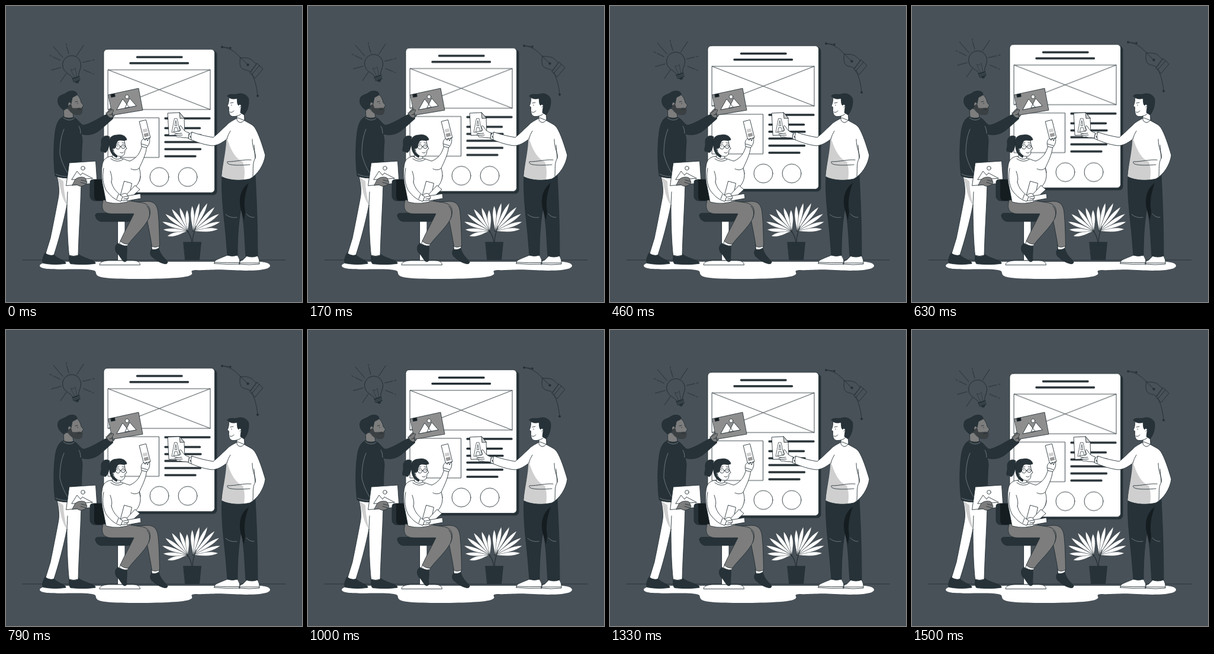
These frames come from a looping animation (500x500 px, 1.54 s). An HTML page:

```html
<!DOCTYPE html>
<html lang="en">
<head>
<meta charset="utf-8">
<title>Wireframe team</title>
<style>
  html, body { margin: 0; width: 100%; height: 100%; overflow: hidden; background: #485158; }
  svg { display: block; width: 100vw; height: 100vh; }
  .float { animation: float 1540ms linear -40ms infinite; }
  @keyframes float {
    0%, 100% { transform: translateY(.3px); }
    50% { transform: translateY(-9.600px); }
  }
  .ink { stroke: #222d32; stroke-width: .85; stroke-linecap: round; stroke-linejoin: round; }
  .w { fill: #fff; }
  .d { fill: #263238; }
  .k { fill: #151d21; }
  .g { fill: #7d7d7d; }
  .c { fill: #8e8e8e; }
  .l { fill: #cfcfcf; }
  .n { fill: none; }
  .bar { stroke-width: 3.4; fill: none; }
  .pale { stroke: #9aa1a5; stroke-width: .6; fill: none; }
  .bare { stroke: none; }
</style>
</head>
<body>
<svg viewBox="0 0 500 500" class="ink">
  <!-- floor -->
  <path class="n" d="M28 429H472"/>
  <path class="w bare" d="M57 439C57 433 74 432 100 432H400C430 430 447 433 446 439C445 447 412 448 380 446C350 444 336 447 322 446C308 446 316 450 314 453C309 459 280 460 240 461C195 461 160 461 154 455C149 449 157 447 138 445C108 443 59 448 57 439Z"/>

  <g class="float">
    <!-- board -->
    <rect class="d" x="168.500" y="76" width="187.500" height="243" rx="6"/>
    <rect class="w" x="165" y="73.300" width="187.500" height="242.200" rx="6"/>
    <path class="bar" d="M221.500 86.500H297M210 96.700H307.500M269 190H344M269 206.500H327.500M269 218.500H329M269 230H329.500M269 242H328.500M269 254H320"/>
    <path class="n" d="M172.500 108H345V175H172.500ZL345 175M345 108L172.500 175M172.500 189H258.500V256H172.500Z"/>
    <g class="w">
      <circle cx="211" cy="289" r="16"/><circle cx="259" cy="289" r="16"/><circle cx="307" cy="289" r="16"/>
    </g>
    <!-- bulb -->
    <g class="n">
      <path d="M80 68.500L96 87M102 64V66.500M102.500 69L106 81M131 66.500L119.500 84M149 91L146 91.700M143 92.400L129.500 95.500M148 115L146 114.300M143.500 113L131 108M92 128.500L102 114M76.500 108.500L93 104M74 83.500L77 85M79.500 86.200L91.500 92"/>
      <g transform="translate(111 99.500) rotate(-18)">
        <path d="M-5.500 22C-5.500 15 -15.500 11 -15.500 0A15.500 15.500 0 0 1 15.500 0C15.500 11 5.500 15 5.500 22Z"/>
        <path stroke-width=".5" d="M-2 22L-4 7L0 9L4 7L2 22"/>
        <path class="d" d="M-6 22.500H6L5.500 29H-5.500ZM-3 29H3L1.500 32H-1.500Z"/>
        <path stroke="#687178" stroke-width=".6" d="M-6 25L6 24.500M-5.500 27.600L5.500 27"/>
      </g>
    </g>
    <!-- pen -->
    <g class="n">
      <path d="M365 69.500L379 71M365 69.500C378 71 387 77 396 87.500M415 114C421 126 424 139 425 152"/>
      <circle class="d" cx="365" cy="69.500" r="1.500"/><circle class="d" cx="379" cy="71" r="1.200"/><circle class="d" cx="425" cy="152" r="1.500"/>
      <path d="M396 87.500C394 95 395 103 399 106C404 109 409 108 413 112L423 98C418 95 417 91 411 89C406 87 400 88 396 87.500ZL408 99"/>
      <circle class="d" cx="408.500" cy="99.500" r="1.700"/>
      <path d="M412 112.500L424 97L434 106.500L421 122ZM416 115L428 101"/>
    </g>
  </g>

  <!-- plant -->
  <g>
    <g id="fans" class="w" stroke-width=".4"></g>
    <path class="n" stroke-width="1.100" d="M314 400C313 390 310 384 305 379M315 400C315 390 317 384 321 372"/>
    <path class="d" d="M300 399H329.500L326.500 428.500H303Z"/>
  </g>

  <!-- man on the left -->
  <g>
    <path class="d" d="M66 417C62 424 60 432 63 434.500C76 437 90 437 101 435C102 430 87 428 81 420ZM107 420C106 428 107 434 109 435.500C123 437 139 437 151 435C152 429 134 428 122 419Z"/>
    <path class="w" d="M86 287C89 301 91 312 88 326C84 347 79 373 75 392L67 418Q74 423 81 420.500C89 396 97 366 103 336C103 365 104 398 106.500 421Q114 424 122 421C123 380 126 340 127 300L126 285Z"/>
    <path class="l bare" d="M87 289L97 296C97 309 100 322 102.500 335C94 326 92 306 87 289Z"/>
    <path class="n" d="M103 336L104 314"/>
    <path class="g" d="M97 172L98 190Q107 195 114 188L112 176Z"/>
    <path class="g" d="M106 150H120C124 153 126 158 127 163L131 168L128.500 170.500C129 178 129 183 123 183.500C114 184 105 178 104 170Z"/>
    <path class="bare" fill="#3b4043" d="M104 169L110 165L112 172C118 174 123 170 128 172.500C130 180 128 184 122 184C113 183 107 179 104 169Z"/>
    <path class="d" d="M98 176C91 172 85 164 88.500 155C91 150 98 150 103 146C109 142 119 143 120 148.500C120 152 115 152 112 155L110 165C108 160 103 163 105 170Z"/>
    <path class="n" d="M117 162L121 161M121 164V165M121 175L127 174.500"/>
    <path class="d" d="M97 187C89 190 85 199 83 213C80 235 80 265 83 287C97 293 115 291 127 285C128 272 127 250 129 229C129 224 128 220 127 216C138 220 151 216 158 210C167 203 174 196 181 190L172 182C160 187 147 197 133 201C126 203 124 192 114 188Q105 191 97 187Z"/>
    <path class="pale" d="M97 189Q106 196 115 190M98 208C92 222 91 237 91 250C94 264 100 276 106 285M126 215Q126 207 123 203M84 284C90 287 97 288 103 288"/>
    <path class="w" d="M107 265L151.500 262L154 299L102 303.500Z"/>
    <circle class="w" cx="130" cy="274" r="3.300"/>
    <path class="w" d="M111 293L120 279L126 286L129 282L146 291Z"/>
    <path class="g" d="M117 293C122 288 131 288 134 291L137 298C133 305 125 306 120 302L112 303ZM127 294L135 296M126 298L134 300"/>
    <path class="g" d="M170 182C171 177 178 171 182 172L184 180C184 187 180 190 177 189Z"/>
    <path class="c" d="M173 150L224 139L231 176L180 184.500Z"/>
    <path class="k" d="M177 149.500L183.500 148.200L184.300 153L178 154.200Z"/>
    <circle class="w" cx="204.500" cy="153.300" r="3.200"/>
    <path class="w" d="M201 172L209 156L220 168.500ZM187 175L197 157L208 171Z"/>
    <path class="g" d="M169 181C174 180 177 174 181 175C183 177 179 180 179 183L181 187C177 191 173 188 169 181ZM175 184L181 182"/>
  </g>

  <!-- chair and woman -->
  <g>
    <path class="d" d="M142 299Q141 293 148 293H164Q169 294 169 300V324Q168 329 162 329H149Q143 328 142 322Z"/>
    <path class="k bare" d="M150 293H164Q169 294 169 300V324Q168 329 162 329H154Q149 328 149 322V299Q148 295 150 293Z"/>
    <path class="w" d="M189 363H201V430H189Z"/>
    <path class="w" d="M158 437C158 432 166 430 176 430H214C223 430 226 433 226.500 437Z"/>
    <path class="d" d="M151 354Q151 350 156 350H212Q217 351 215 356Q213 364 205 364H160Q152 362 151 354Z"/>
    <path class="w" d="M246 404L259 404L258 412H247ZM194 396L208 401L203 407L192 402Z"/>
    <path class="d" d="M246 411Q252 413 258 409C260 419 267 425 273 432Q273 437 266 435C258 433 252 428 246 423C243 419 243 414 246 411ZM189 401Q197 406 204 405C205 414 203 421 204 430Q201 434 197 430C193 425 191 420 187 417C183 411 184 404 189 401Z"/>
    <path class="g" d="M204 332L239 330C251 330 256 337 257 350C259 370 259 389 259.500 405Q253 409 246.500 406C244 389 240 371 237 354L230 344Z"/>
    <path class="g" d="M164 328C160 343 164 351 180 351H216C209 366 200 381 193 397Q199 403 207 402C216 389 234 374 241 359C247 344 242 334 228 332L200 328Z"/>
    <path class="n" d="M241 359C244 351 243 344 238 338"/>

    <path class="d" d="M175 221C168 216 160 222 161 231C162 238 158 242 161 246C165 244 165 249 169 247C174 241 175 233 174 227Z"/>
    <path class="w" d="M180 244V259Q188 264 194 257L193 251Z"/>
    <path class="w" d="M181 230C185 224 196 222 200 228L201.500 236L204 241L201 243C201 250 199 255 192 254C185 254 179 247 181 230Z"/>
    <path class="d" d="M175 237C171 226 177 218 187 218C194 216 203 219 204 226C198 229 193 225 189 228C185 232 186 238 183 241C179 238 179 245 182 248L188 253L187 256C180 253 175 246 175 237Z"/>
    <g class="n">
      <circle cx="189" cy="238" r="3.700"/><circle cx="198" cy="237.500" r="3.300"/>
      <path d="M192.700 237.500H194.700M180 237.500L185.300 238M189 237V238M198 236.500V237.500M193 247.500Q197 249.500 199 246.500M187 232L191 231M196 231L200 231.500"/>
    </g>

    <path class="w" d="M178 254Q170 254 165 261C160 270 161 293 164 305L169 331Q190 337 214 328C211 318 217 308 223 300C228 291 228 283 225 274C229 265 237 250 237.500 238L230 235C227 248 221 257 209 262C202 260 198 258 194 257Q186 262 178 254Z"/>
    <path class="n" d="M225 274C222 277 216 278 211 275M177 258Q188 266 198 259"/>
    <path class="w" d="M225.500 195L236.500 192.300L244 222.500L233 225.500Z"/>
    <path class="l bare" d="M230.500 208.500L238 206.800L239.500 212L232 214Z"/>
    <path class="bare" fill="#999" d="M232.500 216L240 214L241.300 219.500L234 221.500Z"/>
    <path class="w" d="M229 237C227 230 229 225 233 224L235 227L237 223L239 228L242 222C244 228 242 234 238 239ZM229 233L239 236"/>
    <path class="w" d="M200 296L212.500 299.500L208 322L193 322Z"/>
    <path class="w" d="M203 319L218 303L226 310L207 327Z"/>
    <path class="w" d="M204 321L227 317L228 325L205 329Z"/>
    <path class="w" d="M193 321C196 316 203 315 205 319L207 324C204 330 197 330 190 327ZM198 323L205 321M199 326L206 325"/>
    <path class="w" d="M165 274C162 289 164 301 169 311C177 322 185 328 194 330L197 322C188 316 180 308 178 297"/>
    <path class="n" d="M178 297C180 292 178 285 176 279M190 318L187 326"/>
  </g>

  <!-- man on the right -->
  <g>
    <path class="w" d="M352 435C351 429 358 428 364 425L374 421H391Q396 428 395 436Q373 437 352 435ZM394 436Q393 431 400 429L407 422H425Q429 429 428 436Q411 438 394 436Z"/>
    <path class="n" d="M352 433Q373 434 395 433.500M394 434H428"/>
    <path class="d" d="M365 286C363 318 368 354 371 384L374 421Q382 424 391 421C391 395 392 370 397 341C403 367 403 398 405 422Q416 426 425 422C425 381 424 341 421 286Z"/>
    <path class="k bare" d="M396 341C393 324 397 308 410 299C405 313 401 328 404 348L402 362Z"/>
    <path class="pale" d="M371 352Q379 359 390 357M406 351Q412 358 419 357"/>

    <path class="w" d="M273.500 181L293 180L301 189.500L302 217.500L275.500 218.500Z"/>
    <path class="l" d="M293 180L294 190L301 189.500Z"/>
    <path class="w" stroke-width=".7" d="M280 213L284.500 190H289L293.500 211H290.500L289.300 205.500H284.800L283.500 212.500ZM285.300 202L286.800 193.500L288.700 202Z"/>

    <path class="w" d="M391 180L389 195Q398 199 403 192L402 180Z"/>
    <path class="w" d="M377 154C376 160 377 163 374 168.500L376.500 171C376 179 377 186 383 186.500C392 187 400 183 402 174L403 156Z"/>
    <path class="d" d="M374 152C377 147 386 151 392 148.500C401 146 411 152 410 161C410 170 407 178 402 184L396 180L397 172C399 168 395 164 393 168C390 166 391 160 390 156C384 158 378 157 374 152Z"/>
    <path class="n" d="M379 164L384 163M381 167V168M378 179Q382 181 385 177M395 171Q398 167 398 172"/>
    <path class="w" d="M391 189C384 193 377 196 372 202C364 209 358 216 350 222C338 220 325 217 314 213Q307 217 308 224C322 230 336 235 349 236C360 235 367 229 373 225C372 247 366 266 364 288C377 295 400 295 412 292C425 285 436 268 438 252C433 235 427 216 420 205C415 199 410 198 402 193Z"/>
    <path class="l bare" d="M372.500 221C372 246 366 266 364.500 287.500C377 294 391 294 402 293C404 282 403 271 400 263C386 257 379 241 372.500 221Z"/>
    <path class="n" d="M373 225Q375 217 379 211M416 225C416 242 423 249 421 257C416 266 418 274 417 288M421 257L419 235M414 260C400 259 389 263 374 263C371 269 390 270 412 268M390 190Q389 195 396 197Q403 195 404 190M314 213Q311 219 313 226"/>
    <circle class="d" cx="311.500" cy="221" r=".6"/>
    <path class="w" d="M309 214C302 213 299 208 296 203C293 201 292 204 295 209C295 212 290 212 285 212C282 214 285 215 290 215.500C285 216 283 218 288 218.500C286 220.500 289 222 294 221C298 223 303 222 308 223ZM290 215.500L297 215M288 218.500L298 218"/>
  </g>
</svg>
<script>
  const fans = document.getElementById('fans');
  const leaf = (x, y, deg, len) => {
    const p = document.createElementNS('http://www.w3.org/2000/svg', 'path');
    p.setAttribute('d', `M0 0C${len * .4} -2 ${len * .65} -6 ${len} 0C${len * .7} 5 ${len * .4} 3 0 0Z`);
    p.setAttribute('transform', `translate(${x} ${y}) rotate(${deg})`);
    fans.append(p);
  };
  // leaves are longest in the middle of a fan
  const fan = (x, y, from, to, n, len) => {
    for (let i = 0; i < n; i++) {
      const u = i / (n - 1);
      leaf(x, y, from + (to - from) * u, len + 12 * Math.sin(Math.PI * u));
    }
  };
  fan(307, 380, -194, -92, 7, 36);
  fan(316, 380, -92, -4, 7, 43);
</script>
</body>
</html>
```
